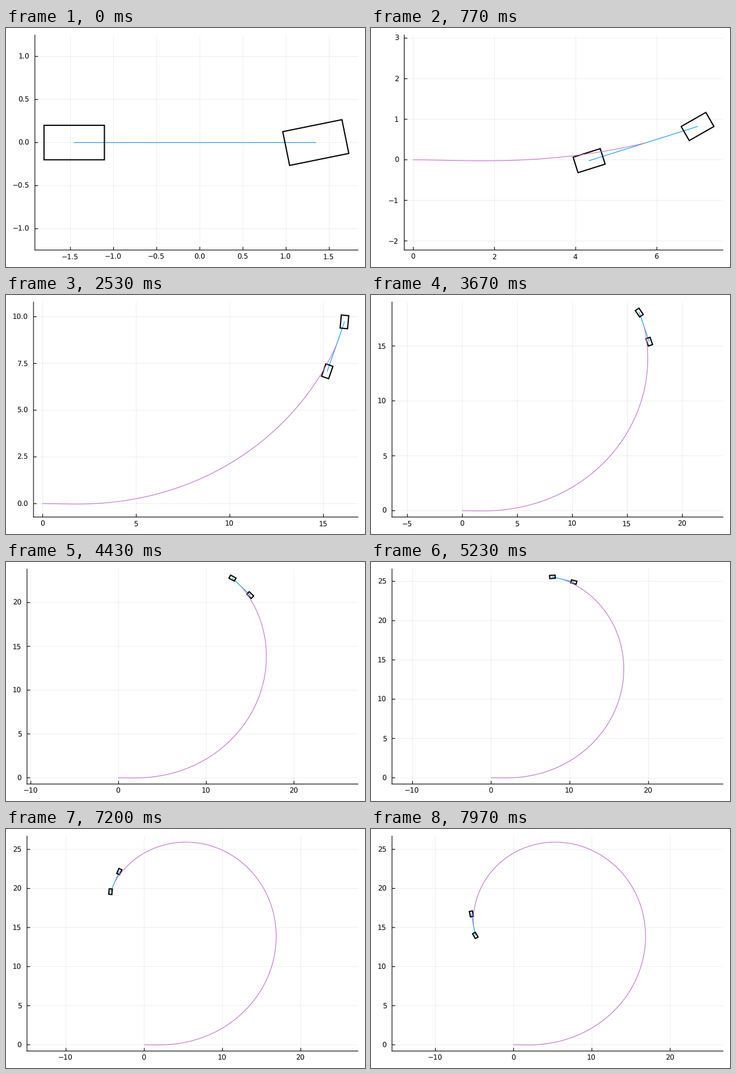
A matplotlib script for the animation above (8000 ms loop, 600 by 400 pixels).

```python
import math

import matplotlib.pyplot as plt
import numpy as np
from matplotlib.animation import FuncAnimation
from matplotlib.collections import LineCollection
from matplotlib.patches import Polygon

plt.rcParams.update({
    "font.family": "DejaVu Sans",
    "path.snap": False,
    "text.hinting": "none",
})

LOOP, TICK = 8000, 20               # ms; the clock runs finer than the motion
STEPS, FPS, SUB = 240, 30, 4
W, H, DPI = 600, 400, 100
PX = 72 / DPI                       # points per pixel
TOP, RIGHT, BOTTOM = 11.8, 588.2, 371.6
EM = 11.7                           # tick font size in pixels

# Car: wheel size and distances from centre of mass to the axles
WHEEL_L, WHEEL_W = 0.7, 0.4
REAR, FRONT = 1.456, 1.344
SPEED = 7.505


def heading(t):
    return 0.46 * t + 0.02025 * t**2 - 0.059 * (1 - np.exp(-t / 0.128))


def steer(t):
    return 0.2 + 0.0175 * t


def course(t):
    """Direction of travel: heading plus side slip."""
    fast = np.exp(-t / 0.128)
    yaw_rate = 0.46 * (1 - fast) + 0.0405 * t
    return heading(t) - 0.163 * yaw_rate + 0.010 * (np.exp(-t / 2) - fast)


def integrate(rate, dt):
    return np.concatenate([[0], np.cumsum((rate[1:] + rate[:-1]) / 2) * dt])


times = np.arange((STEPS - 1) * SUB + 1) / (FPS * SUB)
dt = times[1]
track = np.column_stack([
    integrate(SPEED * np.cos(course(times)), dt),
    integrate(SPEED * np.sin(course(times)), dt),
])


def unit(angle):
    return np.array([math.cos(angle), math.sin(angle)])


def wheel(centre, angle):
    along = unit(angle) * WHEEL_L / 2
    across = unit(angle + math.pi / 2) * WHEEL_W / 2
    return centre + np.array([-along - across, along - across,
                              along + across, -along + across])


def nice_ticks(lo, hi):
    """Choose 4 to 8 round ticks; return them with their labels."""
    span = hi - lo
    best = None
    top = math.ceil(math.log10(span))
    for z in range(top, top - 3, -1):
        for q, nice in ((1, 1), (5, 0.9), (2, 0.7), (2.5, 0.5), (3, 0.2)):
            step = q * 10.0**z
            first, last = math.ceil(lo / step), math.floor(hi / step)
            n = last - first + 1
            if not 4 <= n <= 8:
                continue
            score = ((1 - abs(n - 5) / 5) / 4 + nice / 4
                     + 0.5 * span / ((n - 1) * step))
            key = (round(score, 9), step)
            if best is None or key > best[0]:
                digits = max(0, -z + (q == 2.5))
                best = key, step * np.arange(first, last + 1), digits
    _, ticks, digits = best
    labels = [f"{v + 0.0:.{digits}f}".replace("-", "\u2212") for v in ticks]
    return ticks, labels


def width_in_em(label):
    return sum({".": 0.318, "\u2212": 0.838}.get(c, 0.636) for c in label)


fig = plt.figure(figsize=(W / DPI, H / DPI), dpi=DPI, facecolor="white")
ax = fig.add_axes([0, 0, 1, 1])
ax.set_xlim(0, W)
ax.set_ylim(H, 0)
ax.axis("off")

grid = LineCollection([], colors="black", alpha=0.065, linewidths=1 * PX, zorder=1)
frame_lines = LineCollection([], colors="black", linewidths=1.1 * PX, zorder=2,
                             capstyle="projecting")
tick_lines = LineCollection([], colors="black", linewidths=1.1 * PX, zorder=2)
for lines in (grid, frame_lines, tick_lines):
    ax.add_collection(lines, autolim=False)

body, = ax.plot([], [], color="#009afa", lw=1.1 * PX, zorder=3)
wheels = [ax.add_patch(Polygon(np.zeros((4, 2)), fill=False, ec="black",
                               lw=2 * PX, joinstyle="miter", zorder=4))
          for _ in range(2)]
trail, = ax.plot([], [], color="#c271d2", lw=1.1 * PX, zorder=5)

x_texts = [ax.text(0, 0, "", size=EM * PX, ha="center", va="baseline")
           for _ in range(8)]
y_texts = [ax.text(0, 0, "", size=EM * PX, ha="right", va="baseline")
           for _ in range(8)]


def put_labels(texts, labels, points):
    for text in texts:
        text.set_text("")
    for text, label, point in zip(texts, labels, points):
        text.set_text(label)
        text.set_position(point)


def update(i):
    # Motion step showing at the middle of this clock tick
    step = min(round((i + 0.5) * TICK * STEPS / LOOP), STEPS - 1)
    t = step / FPS
    psi = heading(t)
    path = track[:step * SUB + 1]
    centre = path[-1]
    rear = centre - REAR * unit(psi)
    front = centre + FRONT * unit(psi)
    boxes = [wheel(rear, psi), wheel(front, psi + steer(t))]

    # Padded data limits, then widened to an equal aspect
    pts = np.vstack([path, *boxes])
    lo, hi = pts.min(axis=0), pts.max(axis=0)
    mid, size = (lo + hi) / 2, (hi - lo) * 1.06
    _, labels = nice_ticks(mid[1] - size[1] / 2, mid[1] + size[1] / 2)
    left = 20.6 + 11.4 * max(map(width_in_em, labels))
    area = np.array([RIGHT - left, BOTTOM - TOP])
    scale = min(area / size)
    half = area / scale / 2
    origin = np.array([(left + RIGHT) / 2, (TOP + BOTTOM) / 2])

    def to_px(p):
        return origin + (np.asarray(p) - mid) * scale * [1, -1]

    x_ticks, x_labels = nice_ticks(mid[0] - half[0], mid[0] + half[0])
    y_ticks, y_labels = nice_ticks(mid[1] - half[1], mid[1] + half[1])
    xs = origin[0] + (x_ticks - mid[0]) * scale
    ys = origin[1] - (y_ticks - mid[1]) * scale

    grid.set_segments([[(x, TOP), (x, BOTTOM)] for x in xs]
                      + [[(left, y), (RIGHT, y)] for y in ys])
    tick_lines.set_segments([[(x, BOTTOM), (x, BOTTOM - 5.2)] for x in xs]
                            + [[(left, y), (left + 5.2, y)] for y in ys])
    frame_lines.set_segments([[(left, TOP), (left, BOTTOM)],
                              [(left, BOTTOM), (RIGHT, BOTTOM)]])
    put_labels(x_texts, x_labels, [(x - 0.8, 387.2) for x in xs])
    put_labels(y_texts, y_labels, [(left - 9, y + 4.3) for y in ys])

    body.set_data(*to_px([rear, front]).T)
    trail.set_data(*to_px(path).T)
    for patch, box in zip(wheels, boxes):
        patch.set_xy(to_px(box))
    return []


anim = FuncAnimation(fig, update, frames=LOOP // TICK, interval=TICK,
                     init_func=lambda: update(0), repeat=True, repeat_delay=0)
plt.show()
```
